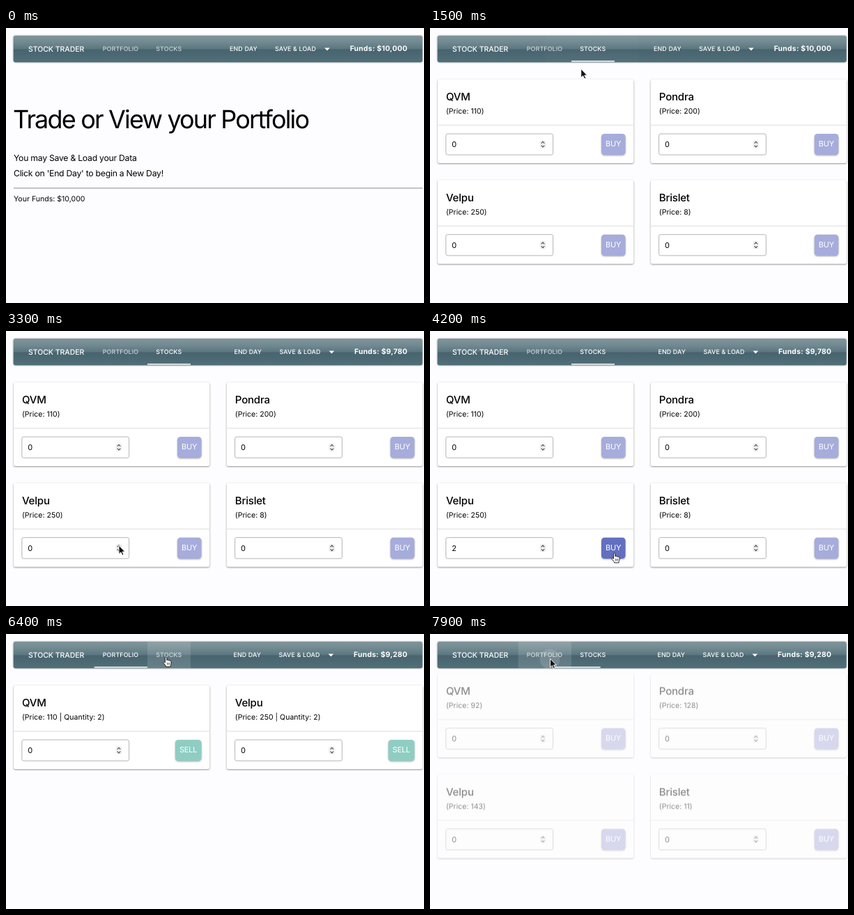
An HTML page that plays this animation: 600 by 395 pixels, repeating every 8 s.

```html
<!DOCTYPE html>
<html lang="en">
<head>
<meta charset="utf-8">
<title>Stock Trader</title>
<style>
  html, body { margin: 0; width: 100%; height: 100%; overflow: hidden; background: #fdfcfe; }
  svg { display: block; width: 600px; height: 395px; font-family: Inter, "Open Sans", sans-serif; }
  text { white-space: pre; text-rendering: geometricPrecision; }
  .brand { font-size: 10.5px; font-weight: 500; letter-spacing: -.05px; fill: #fff; }
  .tab { font-size: 8.8px; letter-spacing: .17px; font-weight: 500; fill: #fff; }
  .act { font-size: 8.9px; letter-spacing: .15px; font-weight: 500; fill: #fff; }
  .funds { font-size: 10.4px; letter-spacing: .25px; font-weight: 700; fill: #fff; text-anchor: end; }
  .title { font-size: 36px; letter-spacing: -1.82px; }
  .lead { font-size: 12.2px; letter-spacing: -.24px; }
  .small { font-size: 10.5px; letter-spacing: .03px; }
  .name { font-size: 15px; letter-spacing: -.2px; font-weight: 500; }
  .value { font-size: 11px; }
  .label { font-size: 11px; letter-spacing: -.2px; fill: #fff; text-anchor: middle; }
  .card { fill: #fff; filter: drop-shadow(0 1px 1.2px rgba(0,0,0,.42)); }
  .btn { filter: drop-shadow(0 1px 1px rgba(0,0,0,.35)); }
  .bar { filter: drop-shadow(0 .8px 1.2px rgba(0,0,0,.45)); }
</style>
</head>
<body>
<svg id="stage" viewBox="0 0 600 395">
  <defs>
    <linearGradient id="glass" x1="0" y1="0" x2="0" y2="1">
      <stop offset="0" stop-color="#80959c"/>
      <stop offset=".25" stop-color="#718990"/>
      <stop offset=".5" stop-color="#5a7680"/>
      <stop offset=".52" stop-color="#48636e"/>
      <stop offset="1" stop-color="#507079"/>
    </linearGradient>
    <clipPath id="barClip"><rect x="10.7" y="11" width="587" height="38.2" rx="3"/></clipPath>
  </defs>
  <g id="pages"></g>
  <g id="nav">
    <rect class="bar" x="10.7" y="11" width="587" height="38.2" rx="3" fill="url(#glass)"/>
    <g clip-path="url(#barClip)" fill="#fff">
      <rect id="hover" y="11" height="38.2"/>
      <circle id="ripple"/>
      <rect id="slider" y="46.9" height="1.6"/>
    </g>
  </g>
  <g id="arrow">
    <path d="M0 0V12.4L2.9 9.8L5 14.2L7 13.3L5 9.1H8.8Z" fill="#111" stroke="#fff" stroke-width=".9" stroke-linejoin="round"/>
  </g>
  <g id="hand">
    <path d="M-1.6 .6C-1.6-.9 .6-.9 .8 .6V4.2C1.8 3.5 2.8 3.8 3 4.6C4 4 5 4.3 5.1 5.1C6.2 4.7 7 5.2 7 6.2V9C7 10.5 6 11.2 6 13.4H-.4C-.6 11.6-2.8 9.8-4.2 7.6C-4.8 6.5-3.4 5.9-2.6 6.8L-1.6 7.7Z" fill="#fff" stroke="#111" stroke-width=".9" stroke-linejoin="round"/>
    <path d="M1.4 7.5V11M3.1 7.5V11M4.8 7.5V11" stroke="#111" stroke-width=".6"/>
  </g>
</svg>
<script>
const LOOP = 8000, NS = 'http://www.w3.org/2000/svg';
const $ = id => document.getElementById(id);

function el(parent, tag, attrs, content) {
  const node = document.createElementNS(NS, tag);
  set(node, attrs);
  if (content !== undefined) node.textContent = content;
  parent.append(node);
  return node;
}
function set(node, attrs) {
  for (const k in attrs) node.setAttribute(k, attrs[k]);
}
const text = (parent, cls, x, y, s) => el(parent, 'text', { class: cls, x, y }, s);

const clamp = v => Math.max(0, Math.min(1, v));
const mix = (a, b, p) => a + (b - a) * p;
const smooth = p => p * p * (3 - 2 * p);

function bezier(x1, y1, x2, y2) {
  const at = (a, b, s) => 3 * (1 - s) * (1 - s) * s * a + 3 * (1 - s) * s * s * b + s * s * s;
  return x => {
    if (x <= 0) return 0;
    if (x >= 1) return 1;
    let lo = 0, hi = 1;
    for (let i = 0; i < 24; i++) {
      const mid = (lo + hi) / 2;
      if (at(x1, x2, mid) < x) lo = mid; else hi = mid;
    }
    return at(y1, y2, lo);
  };
}
const easeOut = bezier(0, 0, .58, 1);
const swing = bezier(.25, .8, .5, 1);

// last value of a [time, value] list that has been reached
const step = (list, t) => list.reduce((v, [at, next]) => t >= at ? next : v, list[0][1]);

// Navigation bar
const nav = $('nav');
text(nav, 'brand', 32, 34, 'STOCK TRADER');
const tabs = {
  portfolio: { x: 126.7, w: 76.3, text: text(nav, 'tab', 138.8, 33.2, 'PORTFOLIO') },
  stocks: { x: 203, w: 62, text: text(nav, 'tab', 215.3, 33.2, 'STOCKS') },
  endDay: { x: 314, w: 66 }
};
const actions = el(nav, 'g', {});
text(actions, 'act', 321, 33.2, 'END DAY');
text(actions, 'act', 386, 33.2, 'SAVE & LOAD');
el(actions, 'path', { d: 'M457.2 28.6h7.6l-3.8 3.8z', fill: '#fff' });
const funds = text(nav, 'funds', 576.3, 33.2, '');

// Pages
const pages = { home: el($('pages'), 'g', {}), stocks: el($('pages'), 'g', {}), portfolio: el($('pages'), 'g', {}) };

text(pages.home, 'title', 10, 144, 'Trade or View your Portfolio');
text(pages.home, 'lead', 11, 191, 'You may Save & Load your Data');
text(pages.home, 'lead', 11, 212.6, "Click on 'End Day' to begin a New Day!");
el(pages.home, 'path', { d: 'M11 230H598', stroke: '#8a8a8a', 'stroke-width': 1 });
text(pages.home, 'small', 11, 248.5, 'Your Funds: $10,000');

function card(page, i, name, label, color) {
  const g = el(page, 'g', { transform: `translate(${i % 2 * 305.8} ${Math.floor(i / 2) * 144.7})` });
  el(g, 'rect', { class: 'card', x: 11, y: 73.5, width: 281.3, height: 120.5, rx: 2.5 });
  text(g, 'name', 23, 104, name);
  const price = text(g, 'small', 23, 123, '');
  el(g, 'path', { d: 'M11 139.7H292.3', stroke: '#dedede', 'stroke-width': 1 });
  const box = el(g, 'rect', { x: 22.8, y: 152, width: 153.8, height: 30.2, rx: 2.5, fill: '#fff' });
  const value = text(g, 'value', 31.2, 171, '0');
  el(g, 'rect', { x: 157.5, y: 161.3, width: 9, height: 11.6, rx: 3, fill: '#efefef' });
  el(g, 'path', { d: 'M159.8 165.6l2.2-2.4 2.2 2.4M159.8 168.6l2.2 2.4 2.2-2.4', fill: 'none', stroke: '#444', 'stroke-width': 1.1 });
  const w = label === 'BUY' ? 34.5 : 37.5;
  const btn = el(g, 'rect', { class: 'btn', x: 280.5 - w, y: 152, width: w, height: 30.3, rx: 4.5, fill: color });
  text(g, 'label', 280.4 - w / 2, 170.4, label);
  return { price, box, value, btn };
}

const stocks = [
  { name: 'QVM', prices: [110, 92], qty: [[0, 0], [1800, 1], [2000, 2], [2770, 0]], focus: [1750, 2720] },
  { name: 'Pondra', prices: [200, 128] },
  { name: 'Velpu', prices: [250, 143], qty: [[0, 0], [3380, 1], [3600, 2], [4270, 0]], focus: [3330, 4170] },
  { name: 'Brislet', prices: [8, 11] }
];
stocks.forEach((s, i) => s.view = card(pages.stocks, i, s.name, 'BUY', '#a6acdb'));
[stocks[0], stocks[2]].forEach((s, i) => {
  const view = card(pages.portfolio, i, s.name, 'SELL', '#8fcdc3');
  view.price.textContent = `(Price: ${s.prices[0]} | Quantity: 2)`;
  set(view.box, { stroke: '#b4b4b4', 'stroke-width': 1 });
});

// Timeline
const SLIDE = 200;
const route = [[-1000, 'home'], [1068, 'stocks'], [5560, 'portfolio'], [6460, 'stocks'], [7823, 'portfolio']];
const tabMoves = [[1068, 'stocks'], [5566, 'portfolio'], [6466, 'stocks'], [7866, 'portfolio']];
const balance = [[0, '$10,000'], [2770, '$9,780'], [4270, '$9,280']];
const shift = [[0, 0], [2770, 6.4], [4270, 5.4]];
const hovers = [[5120, 5980, 'portfolio'], [6300, 6900, 'stocks'], [7010, 7430, 'endDay'], [7850, 8100, 'portfolio']];
const clicks = [[1090, 232, 32], [5550, 165, 34], [6450, 230, 35], [7090, 358, 39], [7815, 172, 36]];
const hands = [[2560, 2950], [3960, 4500], [5120, 6020], [6270, 6900], [7010, 7420]];
const NEW_DAY = 7120;
// time, x, y
const track = [
  [100, 421, 121], [380, 75, 45], [700, 231.5, 30.5], [1400, 231.5, 30.5], [1740, 162, 164],
  [2020, 162, 165], [2290, 169, 271.5], [2340, 169, 271.5], [2660, 264, 170], [2860, 264, 170],
  [3250, 162, 308], [3640, 162, 308], [4020, 265, 319.5], [4330, 265, 319.5], [4600, 304, 298],
  [4900, 230, 3], [5180, 165, 33], [6040, 165, 33], [6340, 230, 33.5], [6780, 230, 33.5],
  [7060, 358.5, 37.5], [7330, 358.5, 37.5], [7600, 172.5, 35.5], [8000, 172.5, 35.5]
];

function drawPages(t) {
  for (const k in pages) pages[k].style.display = 'none';
  const i = route.reduce((n, r, j) => t >= r[0] ? j : n, 0);
  const age = t - route[i][0];
  const leaving = i > 0 && age < SLIDE;
  const p = leaving ? easeOut(age / SLIDE) : 1 - easeOut((age - SLIDE) / SLIDE);
  const page = pages[route[leaving ? i - 1 : i][1]];
  page.style.display = '';
  set(page, { transform: `translate(0 ${-30 * p})`, opacity: 1 - p });
}

function drawStocks(t) {
  for (const s of stocks) {
    const { price, box, value, btn } = s.view;
    const qty = s.qty ? step(s.qty, t) : 0;
    const focused = s.focus && t >= s.focus[0] && t < s.focus[1];
    price.textContent = `(Price: ${s.prices[t < NEW_DAY ? 0 : 1]})`;
    value.textContent = qty;
    set(box, { stroke: focused ? '#0b6fd0' : '#b4b4b4', 'stroke-width': focused ? 1.8 : 1 });
    set(btn, { fill: qty ? '#6270c0' : '#a6acdb' });
  }
}

function drawNav(t) {
  funds.textContent = 'Funds: ' + step(balance, t);
  set(actions, { transform: `translate(${step(shift, t)} 0)` });

  const i = tabMoves.reduce((n, m, j) => t >= m[0] ? j : n, -1);
  const now = i < 0 ? null : tabs[tabMoves[i][1]];
  const old = i < 1 ? now : tabs[tabMoves[i - 1][1]];
  const p = i < 0 ? 0 : swing((t - tabMoves[i][0]) / 300);
  set($('slider'), now ? { x: mix(old.x, now.x, p), width: mix(old.w, now.w, p) } : { width: 0 });
  const fade = i < 0 ? 0 : clamp((t - tabMoves[i][0] - 20) / 280);
  for (const tab of [tabs.portfolio, tabs.stocks]) {
    const glow = tab === now ? fade : tab === old ? 1 - fade : 0;
    set(tab.text, { opacity: mix(.7, 1, glow) });
  }

  const h = hovers.find(([a, b]) => t >= a && t < b);
  if (h) {
    const tab = tabs[h[2]];
    set($('hover'), { x: tab.x, width: tab.w, opacity: .12 * Math.min(clamp((t - h[0]) / 50), clamp((h[1] - t) / 80)) });
  } else set($('hover'), { width: 0 });

  const c = clicks.find(([a]) => t >= a && t < a + 450);
  const q = c ? (t - c[0]) / 450 : 0;
  set($('ripple'), c ? { cx: c[1], cy: c[2], r: 75 * q, opacity: .16 * (1 - q) } : { r: 0 });
}

function drawCursor(t) {
  const shown = t >= track[0][0];
  const j = Math.max(1, track.findIndex(k => k[0] > t));
  const [a, b] = [track[j - 1], track[j]];
  const p = smooth(clamp((t - a[0]) / (b[0] - a[0])));
  const at = `translate(${mix(a[1], b[1], p)} ${mix(a[2], b[2], p)})`;
  const hand = hands.some(([from, to]) => t >= from && t < to);
  set($('arrow'), { transform: at, opacity: shown && !hand ? 1 : 0 });
  set($('hand'), { transform: at, opacity: shown && hand ? 1 : 0 });
}

function draw() {
  const t = performance.now() % LOOP;
  drawPages(t);
  drawStocks(t);
  drawNav(t);
  drawCursor(t);
  requestAnimationFrame(draw);
}
draw();
</script>
</body>
</html>
```
